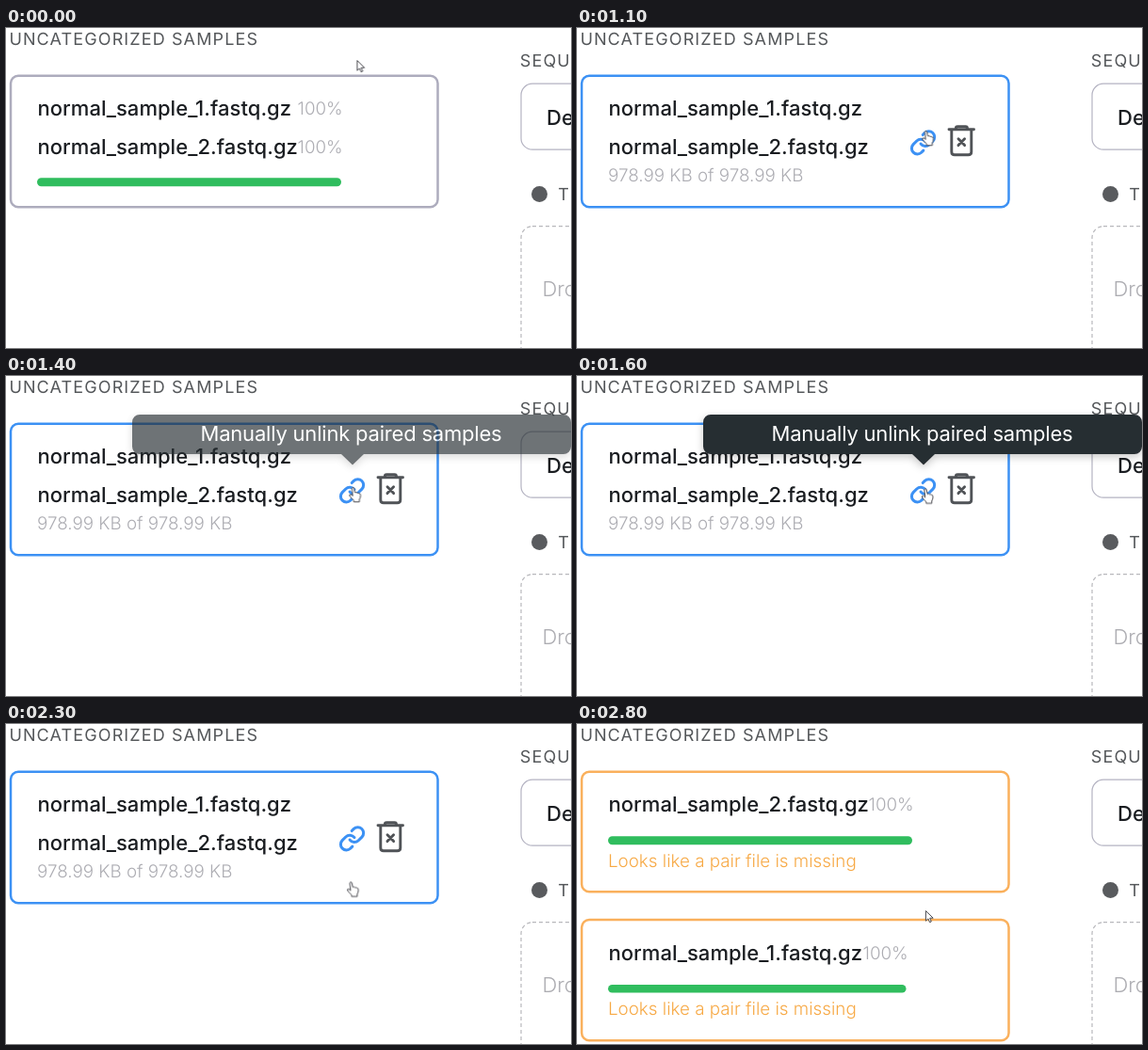
An HTML page that plays this animation: 600x340 px, repeating every 3000 ms.

```html
<!DOCTYPE html>
<html lang="en">
<head>
<meta charset="utf-8">
<title>Unlinking paired samples</title>
<style>
  html, body { margin: 0; width: 100%; height: 100%; overflow: hidden; background: #fff; }
  svg { display: block; width: 600px; height: 340px; }
  text { font: 300 18.8px Inter, sans-serif; font-optical-sizing: none; text-rendering: geometricPrecision; white-space: pre; }
  .head { font-size: 18px; font-weight: 400; letter-spacing: 1.12px; fill: #54575a; }
  .file { font-size: 22px; font-weight: 500; letter-spacing: .05px; fill: #1a1d21; }
  .note { fill: #adadb3; }
  .warn { fill: #f7a945; }
  .drop { font-size: 22px; fill: #adadb2; }
  .tip-text { font-size: 22px; font-weight: 400; letter-spacing: -.2px; fill: #fff; }
  .card { fill: #fff; stroke-width: 2.5; }
  .bar { fill: #30bd5e; }
  .icon { fill: none; stroke-linecap: round; stroke-linejoin: round; }
  .pointer { fill: #fff; stroke: #4a4a50; stroke-linejoin: round; }

  .idle, .hover, .split, .tip, .cursor, .arrow, .hand { animation: 3s step-end infinite; }
  .idle { animation-name: idle; }
  .hover, .hand { animation-name: hover; }
  .split { animation-name: split; }
  .arrow { animation-name: arrow; }
  .tip { animation-name: tip; }
  .cursor { animation-name: move; }

  @keyframes idle { 0% { visibility: visible } 23.33%, 100% { visibility: hidden } }
  @keyframes hover { 0% { visibility: hidden } 23.33% { visibility: visible } 83.33%, 100% { visibility: hidden } }
  @keyframes split { 0% { visibility: hidden } 83.33%, 100% { visibility: visible } }
  @keyframes arrow { 0% { visibility: visible } 23.33% { visibility: hidden } 83.33%, 100% { visibility: visible } }

  @keyframes tip {
    0% { opacity: 0 }
    40% { opacity: 0; animation-timing-function: steps(3) }
    50% { opacity: 1 }
    63.33% { opacity: 1; animation-timing-function: steps(3) }
    73.33%, 100% { opacity: 0 }
  }
  /* the pointer is sampled ten times a second */
  @keyframes move {
    0% { transform: translate(372.5px, 34px) }
    13.33% { transform: translate(372.5px, 34px); animation-timing-function: steps(2) }
    20% { transform: translate(374px, 47px); animation-timing-function: steps(5) }
    36.66% { transform: translate(370.5px, 109px); animation-timing-function: steps(3) }
    46.66% { transform: translate(368.5px, 118px); animation-timing-function: steps(2) }
    53.33% { transform: translate(370px, 119.5px) }
    56.66% { transform: translate(370px, 119.5px); animation-timing-function: steps(6) }
    76.66% { transform: translate(366.2px, 167.5px); animation-timing-function: steps(5) }
    93.33%, 100% { transform: translate(370px, 198px) }
  }
</style>
</head>
<body>
<svg viewBox="0 0 600 340">
  <defs>
    <filter id="shade" x="-5%" y="-40%" width="110%" height="190%">
      <feDropShadow dx="0" dy="3" stdDeviation="4" flood-color="#000" flood-opacity=".22"/>
    </filter>
  </defs>

  <text class="head" x="3.4" y="18">UNCATEGORIZED SAMPLES</text>

  <g fill="#fff" stroke="#b4b3c2" stroke-width="1.2">
    <rect x="547" y="59.2" width="120" height="70" rx="12"/>
    <rect x="547" y="210.7" width="160" height="200" rx="12" stroke="#b8b8bc" stroke-dasharray="4 3"/>
  </g>
  <text class="head" x="545.8" y="40.7">SEQU</text>
  <text class="file" x="574" y="103">De</text>
  <circle cx="566.5" cy="176.5" r="8.5" fill="#595b5e"/>
  <text class="head" x="586.2" y="182.8">T</text>
  <text class="drop" x="569.5" y="285">Drop</text>

  <g class="idle">
    <rect class="card" x="5" y="50.8" width="453.5" height="139.5" rx="8" stroke="#adacbd"/>
    <text class="file" x="33.4" y="93.2">normal_sample_1.fastq.gz</text>
    <text class="note" x="309.5" y="92.3">100%</text>
    <text class="file" x="33.4" y="133.6">normal_sample_2.fastq.gz</text>
    <text class="note" x="309.5" y="132.5">100%</text>
    <rect class="bar" x="33" y="159.3" width="323" height="9" rx="4.5"/>
  </g>

  <g class="hover">
    <rect class="card" x="5" y="50.8" width="453.5" height="139.5" rx="8" stroke="#3c91f4"/>
    <text class="file" x="33.4" y="93.2">normal_sample_1.fastq.gz</text>
    <text class="file" x="33.4" y="133.6">normal_sample_2.fastq.gz</text>
    <text class="note" x="33" y="162.8">978.99 KB of 978.99 KB</text>
    <g class="icon" transform="translate(352.9 107.2) scale(1.22)" stroke="#3c91f4" stroke-width="2.5">
      <path d="M10 13a5 5 0 0 0 7.54.54l3-3a5 5 0 0 0-7.07-7.07l-1.72 1.71"/>
      <path d="M14 11a5 5 0 0 0-7.54-.54l-3 3a5 5 0 0 0 7.07 7.07l1.71-1.71"/>
    </g>
    <path class="icon" stroke="#505357" stroke-width="2.9"
      d="M395 107.8H421.5M402.3 107V106.5Q402.3 104.6 404.2 104.6H412.6Q414.5 104.6 414.5 106.5V107M397.8 108.5V131.5Q397.8 134.8 401 134.8H415.5Q418.8 134.8 418.8 131.5V108.5M405 117.8L411.6 124.6M411.6 117.8L405 124.6"/>
  </g>

  <g class="split">
    <rect class="card" x="5" y="50.8" width="453.5" height="127.5" rx="8" stroke="#fab05c"/>
    <text class="file" x="33.4" y="93.2">normal_sample_2.fastq.gz</text>
    <text class="note" x="309.5" y="92.3">100%</text>
    <rect class="bar" x="33" y="119.3" width="323" height="9" rx="4.5"/>
    <text class="warn" x="33" y="152.3">Looks like a pair file is missing</text>

    <rect class="card" x="5" y="208" width="453.5" height="128.3" rx="8" stroke="#fab05c"/>
    <text class="file" x="33.4" y="251.3">normal_sample_1.fastq.gz</text>
    <text class="note" x="303.5" y="250.3">100%</text>
    <rect class="bar" x="33" y="277" width="316.5" height="8.6" rx="4.3"/>
    <text class="warn" x="33" y="309.3">Looks like a pair file is missing</text>
  </g>

  <g class="tip">
    <path fill="#282d31" filter="url(#shade)"
      d="M142 41H592a8 8 0 0 1 8 8V75a8 8 0 0 1-8 8H380L368 94.5 356 83H142a8 8 0 0 1-8-8V49a8 8 0 0 1 8-8Z"/>
    <text class="tip-text" x="366.5" y="69.3" text-anchor="middle">Manually unlink paired samples</text>
  </g>

  <g class="cursor">
    <path class="arrow pointer" d="M.4.5V11.2L2.9 8.9 4.6 12.7 6.3 12 4.7 8.2H8.2Z"/>
    <path class="hand pointer"
      d="M-1.2 1.3Q-.2-.4 1 1L2.2 6Q3.4 5 4.4 6.3 5.6 5.4 6.4 7 7.9 6.6 8 8.4 8.2 11.6 6.8 13V15.8H.8V14.2Q-1.6 12-3.8 9 -3.6 7.2-1.8 8L-.2 9.4Z"/>
  </g>
</svg>
</body>
</html>
```
